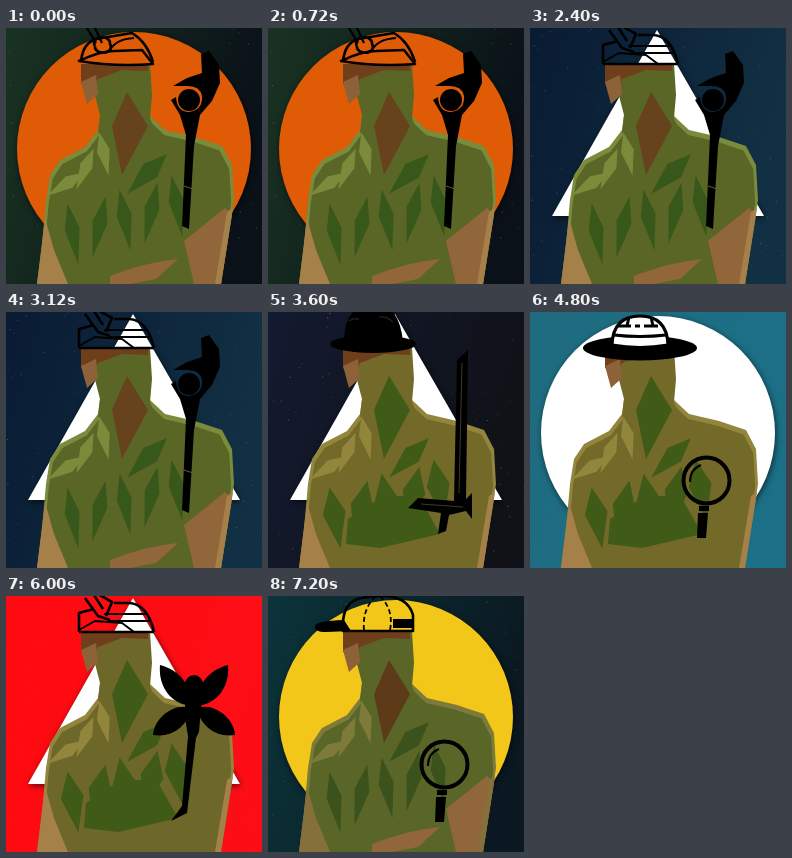
Animation, 256 px wide and 256 px high, one loop 8 s. Source, as an HTML page:

```html
<!DOCTYPE html>
<html lang="en">
<head>
<meta charset="utf-8">
<title>Hats and tools</title>
<style>
html, body { margin: 0; width: 100%; height: 100%; overflow: hidden; background: #000; }
svg { display: block; width: 100vw; height: 100vh; }
.scene { visibility: hidden; }
.scene.on { visibility: visible; }
.back { filter: drop-shadow(1px 2px 3px rgba(0, 0, 0, .6)); }
</style>
</head>
<body>
<svg id="stage" viewBox="0 0 256 256" preserveAspectRatio="none"></svg>
<script>
const STEP = 1200, LOOP = 8000;

const repeat = (n, make) => Array.from({ length: n }, (_, i) => make(i)).join('');
const path = (d, fill = '#000') => `<path d="${d}" fill="${fill}"/>`;
const line = (d, width = 2.6, color = '#000', dash = 'none') =>
  `<path d="${d}" fill="none" stroke="${color}" stroke-width="${width}" stroke-dasharray="${dash}" stroke-linejoin="round"/>`;
const disc = (x, y, rx, ry = rx, fill = '#000') =>
  `<ellipse cx="${x}" cy="${y}" rx="${rx}" ry="${ry}" fill="${fill}"/>`;
const kite = (x, y, length, width, tilt, fill) =>
  `<path transform="translate(${x} ${y}) rotate(${tilt})" fill="${fill}"
    d="M0 ${-length / 2}L${width / 2} ${-length * .08}L0 ${length / 2}L${-width / 2} ${-length * .08}Z"/>`;

const backs = {
  circle: c => `<circle class="back" cx="128" cy="121" r="117" fill="${c}"/>`,
  triangle: c => `<path class="back" d="M127 2L234 188H22Z" fill="${c}"/>`
};

const hats = {
  miner: () =>
    line('M75 33Q77 15 90 11L126 5Q141 14 147 34') +
    line('M73 33Q94 23 108 23L136 22L147 36Q109 39 73 33Z') +
    line('M88 -2L96 15M81 0L90 15M104 22Q110 11 128 10', 2.2) +
    line('M89 18A8 6 0 1 1 104 16A8 6 0 1 1 89 18'),
  bucket: c =>
    path('M80 25L88 2Q110 -5 131 2L139 23L148 38Q112 57 70 42Z') +
    line('M80 20Q110 28 137 18', 3, c) +
    line('M90 10Q110 14 130 9', 1.8, c, '4 5 8 5'),
  folded: () =>
    line('M73 36V17L88 13M73 36H148M108 7H124Q142 9 148 36') +
    line('M73 34L89 25L116 27L128 36M98 18H140M104 25H145', 2) +
    line('M79 2L92 20L104 24M88 -1L97 13M92 -2L106 6L100 20'),
  bowler: () =>
    path('M76 30Q76 7 87 -2H123Q133 8 135 30Z') + disc(105, 32, 43, 9) +
    line('M81 9Q87 5 91 8M111 5Q119 4 125 10', 1.2, '#20232b'),
  boater: () => {
    const dome = 'M82 33Q83 4 110 4Q137 4 138 33Q110 38 82 33Z';
    return disc(110, 36, 57, 12.5) + path(dome, '#fff') + line(dome, 3.2) +
      line('M87 14H133', 3, '#000', '14 4 5 4') + line('M84 23Q110 26 136 23M99 5L97 14M121 5L123 14', 3);
  },
  cap: () =>
    path('M76 24Q48 25 47 30Q46 36 58 36L83 35Z') +
    line('M75 35Q73 5 94 2Q138 -6 145 19V35Z') +
    line('M96 34Q94 13 108 0M122 34Q126 14 112 0', 1.8, '#000', '5 3') +
    path('M125 23H144V32H125Z')
};

const wing = path('M185 110C166 108 152 92 154 69C174 74 186 90 185 110Z') +
  path('M185 112C168 106 148 122 147 139C166 142 182 130 185 112Z');

const tools = {
  wrench: () =>
    path('M195 26L203 23L213 37L214 55L206 73L194 87L188 118L183 201L176 198L180 107L174 87L165 72L170 69' +
      'Q171 84 183 84Q197 82 196 68Q194 58 182 58L167 58L181 50L196 45Z') +
    disc(183, 72, 11) + line('M178 158L187 161', 1, '#52612a'),
  crook: () => line('M175 207V124Q175 114 184 113Q200 109 200 85A18 19 0 0 0 164 85Q164 98 175 98Q184 97 181 88', 10),
  sword: () =>
    path('M189 48L200 38L198 187L204 181V207L198 199L181 203L178 219L170 222L173 201L140 196L150 186L186 189Z') +
    line('M194 51L191 181M153 192L195 195', 1, '#403b20'),
  lens: () =>
    line('M153.500 168.500a23 23 0 1 1 46 0a23 23 0 1 1 -46 0', 4) + line('M160 170Q160 157 171 153', 2) +
    path('M169 194H179V199H169ZM168 201H178L176 226L167 226Z'),
  wand: () =>
    wing + `<g transform="translate(376) scale(-1 1)">${wing}</g>` +
    path('M179 88A9 9 0 0 1 197 88L193 136L190 142L181 217L165 225L176 210L182 140L179 122Z')
};

const TORSO = 'M94 87L92 102L79 119L54 132L44 147L40 172L36 217L31 256H215L228 172L226 137L216 118L189 109L159 102L144 88Z';

function person(p) {
  return path(TORSO, p.light) +
    `<g transform="translate(4 8) scale(.97)">${path(TORSO, p.base)}</g>` +
    path('M88 36H144L146 67L144 90L156 120L112 140L92 104L94 87L87 60Z', p.base) +
    path('M75 36H142V43L116 42L92 51L88 62L75 56Z', p.hair) +
    path('M75 54L90 47L92 66L81 76Z', p.skin) +
    repeat(3, i => kite(60 + i * 19, 156 - i * 15, 44, 13, 58 - i * 35, p.light)) +
    repeat(5, i => kite(67 + i * 26, 206 - i * 7, 62, p.fold, i % 2 ? 12 : -10, p.dark)) +
    kite(141, 146, 56, 19, 45, p.dark) +
    (p.belly ? path('M80 207L113 185L150 183L172 222L112 236L78 232Z', p.dark) : '') +
    path('M121 64L142 98L116 147L106 98Z', p.vee) +
    path('M39 190L48 222L62 256H31Z', p.sleeve) +
    path('M178 213L219 180L226 187L215 256H188Z', p.arm) +
    path('M104 248Q140 234 172 231L150 251L124 256H104Z', p.arm) +
    path('M221 184L227 180L215 256H209Z', p.sleeve);
}

const green = { base: '#5a6625', light: '#7a8c3c', dark: '#38571a', vee: '#66431c', hair: '#6f3f1c',
  skin: '#8d6238', arm: '#91663a', sleeve: '#a58049', fold: 15 };
const moss = { ...green, base: '#5a6628', light: '#7e7a3a', dark: '#3b521c', vee: '#5e3b18', sleeve: '#85703c' };
const olive = { ...green, base: '#736a2a', light: '#92853c', dark: '#405a18', vee: '#405a18',
  arm: '#736a2a', fold: 23, belly: true };
const khaki = { ...olive, base: '#6e672a', arm: '#6e672a' };

const scenes = [
  { sky: ['#193322', '#0a1118'], back: 'circle', fill: '#e05b05', look: green, hat: 'miner', tool: 'wrench', stars: .3 },
  { sky: ['#237b31', '#1f8b44'], back: 'circle', fill: '#df5b05', look: green, hat: 'bucket', tool: 'crook', stars: .13 },
  { sky: ['#091b33', '#123044'], back: 'triangle', fill: '#fff', look: green, hat: 'folded', tool: 'wrench', stars: .35 },
  { sky: ['#131a30', '#101217'], back: 'triangle', fill: '#fff', look: olive, hat: 'bowler', tool: 'sword', stars: .4 },
  { sky: ['#1f6b80', '#1c7086'], back: 'circle', fill: '#fff', look: olive, hat: 'boater', tool: 'lens', stars: .15 },
  { sky: ['#ff0a10', '#fd0e16'], back: 'triangle', fill: '#fff', look: khaki, hat: 'folded', tool: 'wand', stars: .13 },
  { sky: ['#0b343a', '#0b1821'], back: 'circle', fill: '#f2c719', look: moss, hat: 'cap', tool: 'lens', stars: .25 }
];

function starfield(seed, alpha) {
  const rand = max => (seed = seed * 16807 % 2147483647) / 2147483647 * max;
  const star = () => disc(rand(256).toFixed(1), rand(256).toFixed(1), (.2 + rand(.35)).toFixed(2), undefined, '#d5e9ef');
  return `<g opacity="${alpha}">${repeat(150, star)}</g>`;
}

function drawScene(s, i) {
  return `<g class="scene">
    <linearGradient id="sky${i}" x2="1" y2=".3">
      <stop stop-color="${s.sky[0]}"/><stop offset="1" stop-color="${s.sky[1]}"/>
    </linearGradient>
    <rect width="256" height="256" fill="url(#sky${i})"/>
    ${starfield(731 + i * 97, s.stars)}
    ${backs[s.back](s.fill)}${person(s.look)}${tools[s.tool]()}${hats[s.hat](s.fill)}
  </g>`;
}

const stage = document.getElementById('stage');
stage.innerHTML = scenes.map(drawScene).join('');
const groups = [...stage.querySelectorAll('.scene')];
const start = performance.now();

function tick() {
  const current = Math.floor((performance.now() - start) % LOOP / STEP);
  groups.forEach((g, i) => g.classList.toggle('on', i === current));
  requestAnimationFrame(tick);
}
tick();
</script>
</body>
</html>
```
